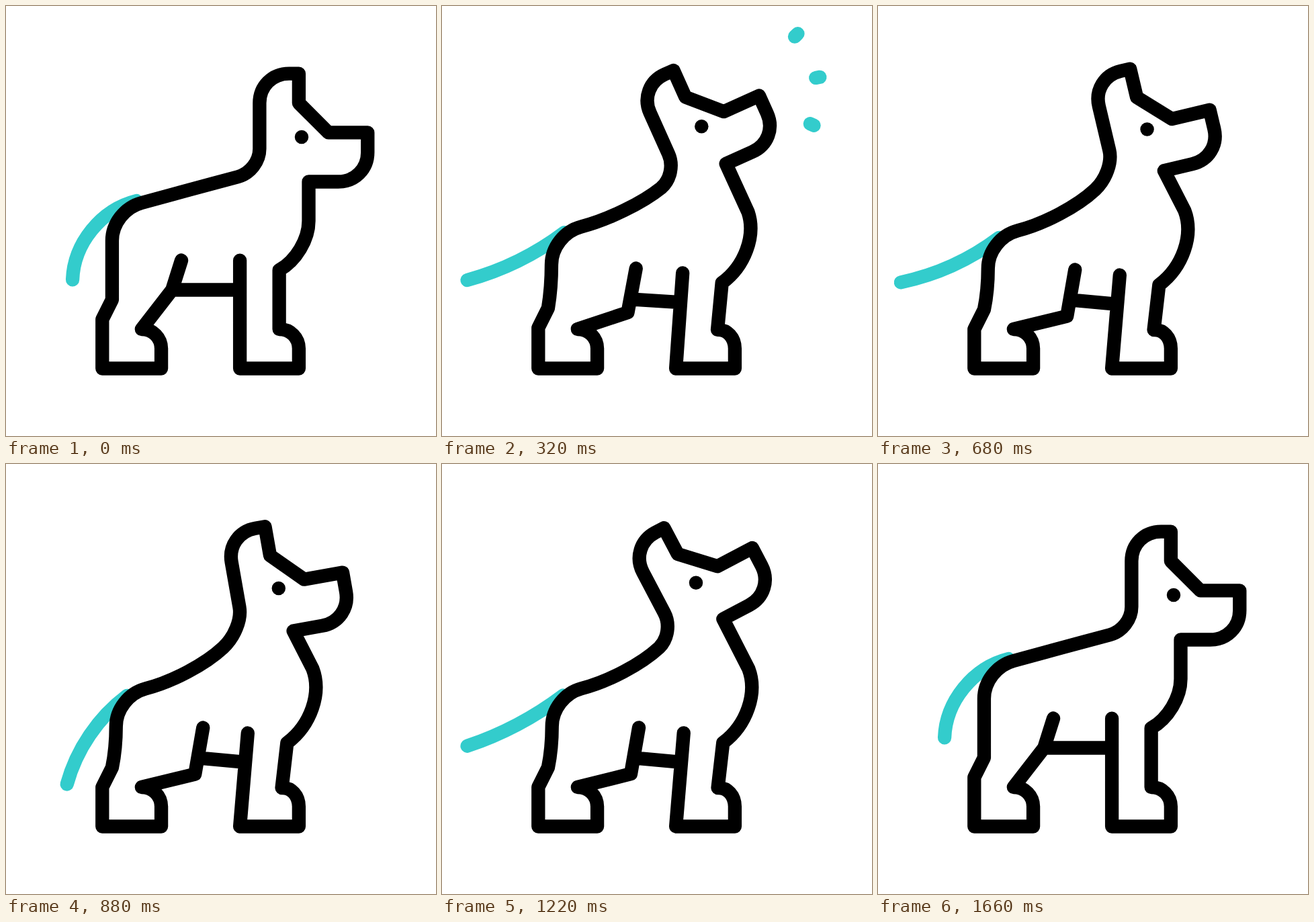
An HTML page that plays this animation: 640x640 px, repeating every 2.4 s.

```html
<!DOCTYPE html>
<html lang="en">
<head>
<meta charset="utf-8">
<title>Dog</title>
<style>
  html, body { margin: 0; width: 100%; height: 100%; overflow: hidden; background: #fff; }
  svg { display: block; width: 100%; height: 100%; }
  path { fill: none; stroke-width: 1.39; stroke-linecap: round; stroke-linejoin: round; }
  .accent { stroke: #33cccc; }
  .ink { stroke: #000; }
</style>
</head>
<body>
<svg viewBox="0 0 640 640">
  <!-- The dog stands on a grid 30 units wide and high. -->
  <g transform="translate(99.4 100.6) scale(14.63)">
    <path id="tail" class="accent"/>
    <path id="sound" class="accent"/>
    <path id="dog" class="ink"/>
    <circle id="eye" r="0.7"/>
  </g>
</svg>
<script>
const LOOP = 2400;
const $ = id => document.getElementById(id);
const lerp = (a, b, k) => a + (b - a) * k;
const between = (p, q, k) => [lerp(p[0], q[0], k), lerp(p[1], q[1], k)];
const clamp = k => Math.min(1, Math.max(0, k));
const smooth = k => k * k * (3 - 2 * k);
const rad = degrees => degrees * Math.PI / 180;
const polar = ([x, y], r, degrees) => [x + r * Math.cos(rad(degrees)), y + r * Math.sin(rad(degrees))];

// Eased value through [time, value] keys.
function track(keys, t) {
  const next = keys.findIndex(k => k[0] > t);
  if (next < 0) return keys[keys.length - 1][1];
  if (next === 0) return keys[0][1];
  const [a, b] = [keys[next - 1], keys[next]];
  return lerp(a[1], b[1], smooth((t - a[0]) / (b[0] - a[0])));
}

// Path builder: straight lines and rounded corners.
function pen(start) {
  let d = `M${start}`, at = start;
  return {
    line(...points) {
      d += points.map(p => `L${p}`).join('');
      at = points[points.length - 1];
      return this;
    },
    round(corner, end) {
      d += `C${between(at, corner, 0.57)} ${between(end, corner, 0.57)} ${end}`;
      at = end;
      return this;
    },
    toString: () => d
  };
}

// How far each part moves when the dog sits back.
const SIT = {
  rump: [0.4, 2.83], flank: [0.4, 2.05], heel: [0, 1], back: [0.2, 3], nape: [-1.5, 1.3],
  shoulder: [0.8, 1.5], breast: [0.4, -1.05], chest: [2.05, 0], paw: [0.27, 0.07],
  knee: [2.33, 2.67], thigh: [2.2, 0.95], tail: [-0.95, 3.75]
};
const sitKeys = [[0, 0], [420, 1], [1200, 1], [1620, 0]];

const NECK = [19.6, 11.75], NECK_SHIFT = [-1.35, -0.15];
const RAISED = rad(28), LOWERED = rad(8.3);
const nodKeys = [[420, 0], [810, 1], [1200, 0]];

// Direction of the tail's tip, in degrees below the horizontal.
const wagKeys = [[0, 88], [170, 77], [340, 13], [520, 69], [700, 10], [890, 75],
  [1160, 10], [1450, 85], [1620, 88]];
const TAIL_LENGTH = 11.07;

const MOUTH = [23.3, 1.83], BARKS = [300, 960], BARK_TIME = 230;

const bodyPose = sit => (x, y, part) => {
  const [dx, dy] = SIT[part] || [0, 0];
  return [x + dx * sit, y + dy * sit];
};

function headPose(sit, nod) {
  const cos = lerp(1, lerp(Math.cos(RAISED), Math.cos(LOWERED), nod), sit);
  const sin = lerp(0, lerp(Math.sin(RAISED), Math.sin(LOWERED), nod), sit);
  const [px, py] = NECK.map((v, i) => v + NECK_SHIFT[i] * sit);
  return (x, y) => {
    const dx = x - NECK[0], dy = y - NECK[1];
    return [px + dx * cos + dy * sin, py - dx * sin + dy * cos];
  };
}

function dogPath(b, h, sit) {
  const elbow = b(17, 19, 'shoulder'), foot = b(17, 30);
  const knee = b(10.1, 22, 'knee'), thigh = b(11.05, 19, 'thigh');
  const outline = pen(elbow)
    .line(foot, b(23, 30), b(23, 28)).round(b(23, 26), b(21, 26, 'paw'))
    .line(b(21, 20, 'shoulder')).round(b(24, 18.3, 'chest'), b(24, 15, 'breast'))
    .line(h(24, 11), h(27, 11)).round(h(30, 11), h(30, 8))
    .line(h(30, 6), h(26, 6), h(23, 3), h(23, 0), h(22, 0)).round(h(19, 0), h(19, 3))
    .line(h(19, 7.65)).round(h(19, 9.9), b(16.8, 10.5, 'nape'))
    .round(b(11.9, 11.8, 'back'), b(7, 13.15, 'rump'))
    .round(b(4, 13.95, 'rump'), b(4, 17, 'rump'))
    .round(b(4, 20, 'flank'), b(4, 23, 'heel'))
    .line(b(3, 25, 'heel'), b(3, 30), b(9, 30), b(9, 28)).round(b(9, 26), b(7, 26))
    .line(knee, thigh);
  const belly = pen(between(knee, thigh, 0.35 * sit))
    .line(between(elbow, foot, 3 / 11 + 0.04 * sit));
  return `${outline}${belly}`;
}

// An arc of fixed length that bends from the root's direction to the tip's.
function tailPath(root, sit, tipAngle) {
  const rootAngle = lerp(14, 37, clamp(3 * sit));
  const half = rad(tipAngle - rootAngle) / 2;
  const chord = TAIL_LENGTH * (half ? Math.sin(half) / half : 1);
  const tip = polar(root, chord, 180 - (rootAngle + tipAngle) / 2);
  const handle = TAIL_LENGTH / 3;
  return `M${root}C${polar(root, handle, 180 - rootAngle)} ${polar(tip, -handle, 180 - tipAngle)} ${tip}`;
}

// Three rays grow outwards, then vanish at their outer ends.
function soundPath(t) {
  const start = BARKS.find(b => t > b && t < b + BARK_TIME);
  if (start === undefined) return '';
  const k = 2 * (t - start) / BARK_TIME;
  const from = lerp(8.05, 10.37, clamp(k - 1)), to = lerp(8.05, 10.37, clamp(k));
  return [-44, -10, 24].map(a => pen(polar(MOUTH, from, a)).line(polar(MOUTH, to, a))).join('');
}

function draw(t) {
  const sit = track(sitKeys, t);
  const b = bodyPose(sit), h = headPose(sit, track(nodKeys, t));
  const [ex, ey] = h(23.28, 6.45);
  $('dog').setAttribute('d', dogPath(b, h, sit));
  $('eye').setAttribute('cx', ex);
  $('eye').setAttribute('cy', ey);
  $('tail').setAttribute('d', tailPath(b(6.47, 12.95, 'tail'), sit, track(wagKeys, t)));
  $('sound').setAttribute('d', soundPath(t));
}

const began = performance.now();
function tick() {
  draw((performance.now() - began) % LOOP);
  requestAnimationFrame(tick);
}
tick();
</script>
</body>
</html>
```
